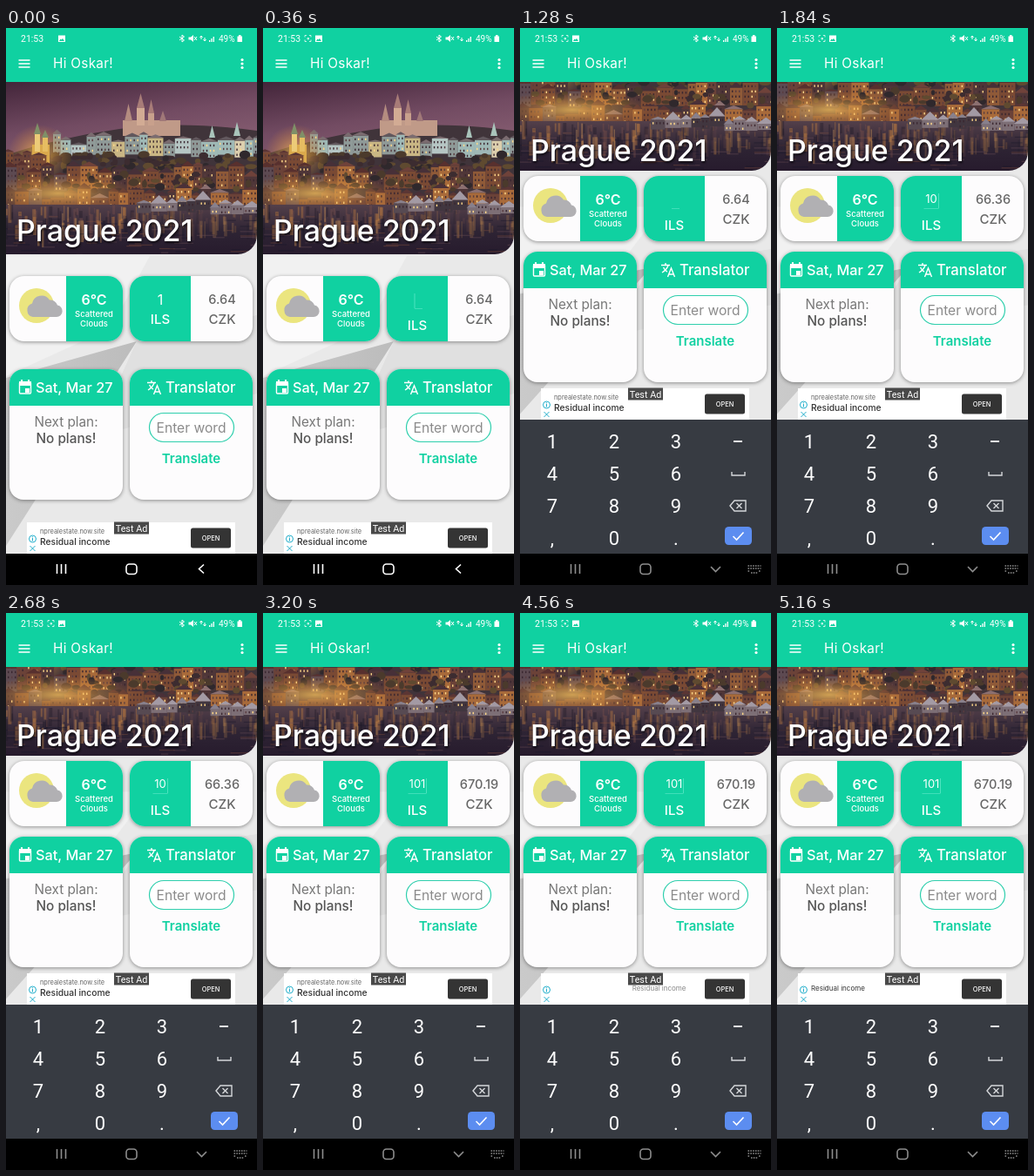
Animation, 288 px wide and 640 px high, one loop 5.6 s. Source, as an HTML page:

```html
<!DOCTYPE html>
<html lang="en">
<head>
<meta charset="utf-8">
<title>Travel dashboard</title>
<style>
html, body { margin: 0; height: 100%; overflow: hidden; background: #000; }
svg { display: block; width: 100vw; height: 100vh; font-family: Inter, Lato, sans-serif; }
.c { text-anchor: middle; }
.w { fill: #fff; }
.g { fill: #10d1a1; }
.b { font-weight: 600; }
.m { font-weight: 500; }
.robo { font-family: Roboto, sans-serif; }
.line { fill: none; stroke: #fff; stroke-width: 1.4; }
.card { fill: #fdfcfd; filter: drop-shadow(0 1px 2px #0006); }
#title { filter: drop-shadow(1px 2px 1px #0009); }
#city { filter: blur(.6px); }
</style>
</head>
<body>
<svg viewBox="0 0 288 640" preserveAspectRatio="none">
  <defs>
    <linearGradient id="sky" x2=".3" y2="1"><stop stop-color="#43253a"/><stop offset=".4" stop-color="#724b62"/><stop offset="1" stop-color="#9a6f80"/></linearGradient>
    <linearGradient id="river" x2="0" y2="1"><stop stop-color="#54404a"/><stop offset=".5" stop-color="#2e2434"/><stop offset="1" stop-color="#261a2c"/></linearGradient>
    <radialGradient id="glow"><stop stop-color="#ffc45c" stop-opacity=".75"/><stop offset="1" stop-color="#e08a30" stop-opacity="0"/></radialGradient>
    <linearGradient id="shade"><stop stop-color="#cacaca"/><stop offset="1" stop-color="#bcbcbc"/></linearGradient>
    <clipPath id="heroClip"><path d="M0 62H288V238a22 22 0 0 1-22 22H0z"/></clipPath>
    <clipPath id="adClip"><rect x="37" y="568" width="173" height="36"/></clipPath>
  </defs>

  <rect y="62" width="288" height="542" fill="#e9e9e9"/>
  <g id="bg">
    <path d="M0 262H165L120 345 0 400z" fill="#f1f1f1"/>
    <path d="M0 402 150 360 0 595z" fill="url(#shade)"/>
    <path d="M150 360 288 330V420L100 470z" fill="#e0e0e0"/>
  </g>

  <g data-up="96" clip-path="url(#heroClip)"><g id="city"></g></g>
  <g data-up="92.5">
    <text id="title" class="w m" x="12" y="245" font-size="34">Prague 2021</text>
  </g>

  <g data-up="115">
    <rect class="card" x="4" y="285" width="130" height="75" rx="17"/>
    <path class="g" d="M69 285h48a17 17 0 0 1 17 17v41a17 17 0 0 1-17 17H69z"/>
    <circle cx="35" cy="319" r="20" fill="#ebe57f"/>
    <path d="M31 332a8 8 0 0 1-1-15.500a11 11 0 0 1 20-4a8.500 8.500 0 0 1 9 6a6.800 6.800 0 0 1-1 13.500z" fill="#b1b0b3"/>
    <g class="w c">
      <text class="b" x="101" y="318" font-size="16">6°C</text>
      <text class="m" x="101" y="332" font-size="9.500">Scattered</text>
      <text class="m" x="101" y="343" font-size="9.500">Clouds</text>
    </g>
    <rect class="card" x="142" y="285" width="141" height="75" rx="17"/>
    <path class="g" d="M212 285h-53a17 17 0 0 0-17 17v41a17 17 0 0 0 17 17h53z"/>
    <g class="c">
      <text id="amount" class="w" x="177"></text>
      <text id="unit" class="w m" x="177" font-size="15">ILS</text>
      <text id="rate" class="m" x="248" y="317" font-size="14.500" fill="#666"></text>
      <text class="m" x="248" y="340" font-size="15" fill="#666">CZK</text>
    </g>
    <path id="under" stroke="#4ce3bf" stroke-width="1"/>
    <path id="caret" stroke="#4ce3bf" stroke-width="1"/>
  </g>

  <g data-up="135">
    <rect class="card" x="4" y="392" width="130" height="150" rx="16"/>
    <path class="g" d="M4 434v-26a16 16 0 0 1 16-16h98a16 16 0 0 1 16 16v26z"/>
    <rect class="line" x="15.500" y="407" width="13" height="13" rx="1"/>
    <path class="w" d="M15 406h14v5H15zM17 404h2v3h-2zM25 404h2v3h-2zM22 414h5v5h-5z"/>
    <text class="w m" x="34" y="419" font-size="16.300">Sat, Mar 27</text>
    <g class="c" font-size="15.300">
      <text x="69" y="458" fill="#777">Next plan:</text>
      <text class="m" x="69" y="477" fill="#555">No plans!</text>
    </g>
    <rect class="card" x="142" y="392" width="141" height="150" rx="16"/>
    <path class="g" d="M142 434v-26a16 16 0 0 1 16-16h109a16 16 0 0 1 16 16v26z"/>
    <path class="line" d="M162 407.500h10M167 405v2.500M170 408q-2 5-7 8M164.500 410q2 4 4.500 5M169.500 421l4-10 4 10M171 418h5"/>
    <text class="w m" x="183" y="419" font-size="16.700">Translator</text>
    <rect x="164.500" y="442.500" width="97" height="33" rx="16.500" fill="#fff" stroke="#2fcfad" stroke-width="1.200"/>
    <text class="c" x="212.500" y="465" font-size="15.600" fill="#8b8b8b">Enter word</text>
    <text class="c g b" x="212.500" y="500" font-size="15">Translate</text>
  </g>

  <g data-up="154">
    <rect x="24" y="568" width="239" height="36" fill="#fff"/>
    <circle cx="30.500" cy="587" r="4" fill="none" stroke="#21aecb"/>
    <path d="M30.500 586v3.500M30.500 584.300v1M27.500 595l6 6M33.500 595l-6 6" stroke="#21aecb"/>
    <g clip-path="url(#adClip)" fill="#333">
      <g id="oldAd">
        <text x="39" y="581" font-size="7.400" fill="#666">nprealestate.now.site</text>
        <text class="m" x="39" y="594" font-size="10.300">Residual income</text>
      </g>
      <text id="newAd" y="588" font-size="8">Residual income</text>
    </g>
    <rect x="212" y="574.500" width="46" height="23" rx="2.500" fill="#343434"/>
    <text class="w c m" x="235" y="589" font-size="7.400">OPEN</text>
    <rect x="124" y="567.500" width="40" height="14" fill="#303030" fill-opacity=".88"/>
    <text class="w c robo" x="144" y="578.500" font-size="10.800">Test Ad</text>
  </g>

  <g>
    <rect class="g" width="288" height="62"/>
    <g class="w robo" font-size="10">
      <text x="17" y="16" font-size="10.500">21:53</text>
      <text x="244" y="16">49%</text>
      <path fill-rule="evenodd" d="M60 8.500h8v7.500h-8zM61 15h6l-2-3-1.500 1.500-1-1z"/>
      <path d="M209.500 10.500h2.500l3-2.500v8l-3-2.500h-2.500zM233 16v-2h1.300v2zM235.300 16v-4h1.300v4zM237.600 16v-6h1.300v6z"/>
      <path d="M265.500 9.500h1.500V8h2.500v1.500h1.500V16h-5.500z"/>
    </g>
    <path id="shot" class="line" style="stroke-width:1" d="M48 10.500v-2h2M53 8.500h2v2M55 13.500v2h-2M50 15.500h-2v-2M51 11.500h1.500v1.500H51z"/>
    <path class="line" style="stroke-width:1" d="M199 10l5.500 4-2.500 2V8l2.500 2-5.500 4M216 10l3 4M219 10l-3 4M224 9v4M222.500 11l1.500-2 1.500 2M228 11v4M226.500 13l1.500 2 1.500-2"/>
    <path class="line" d="M14.500 37h13M14.500 41h13M14.500 45h13" style="stroke-width:1.600"/>
    <text class="w" x="54" y="46" font-size="15.300" letter-spacing=".3">Hi Oskar!</text>
    <g class="w"><circle cx="271" cy="36.500" r="1.600"/><circle cx="271" cy="41" r="1.600"/><circle cx="271" cy="45.500" r="1.600"/></g>
  </g>

  <g id="keys" class="w c robo" font-size="22">
    <rect y="450" width="288" height="154" fill="#373b42"/>
    <path class="line" style="stroke:#d5d7da" d="M243 510v4h15v-4M241 549l5-6h13v12h-13zM248.500 546l6 6M254.500 546l-6 6"/>
    <path class="line" style="stroke-width:1.800" d="M245 475h10"/>
    <rect x="235" y="573" width="31" height="21" rx="4.500" fill="#5c8df0"/>
    <path class="line" style="stroke-width:1.600" d="M244.500 584l4 4 8-8.500"/>
  </g>

  <rect y="604" width="288" height="36" fill="#000"/>
  <g id="nav" fill="none" stroke="#fff" stroke-width="1.600">
    <path d="M58.500 616v11M63.500 616v11M68.500 616v11"/>
    <rect x="138" y="616" width="12" height="11.500" rx="3.500"/>
    <path id="back" d="M227 616.500l-5.500 5 5.500 5"/>
    <g id="down">
      <path d="M219 619l5.500 5.500 5.500-5.500"/>
      <path stroke-width="1.300" stroke-dasharray="1.600 1.200" d="M261.500 618h15M261.500 621h15M261.500 624h2M265 626h8M274 624h2.500"/>
    </g>
  </g>
</svg>
<script>
const $ = id => document.getElementById(id);
const set = (id, attrs) => { for (const k in attrs) $(id).setAttribute(k, attrs[k]); };
const clamp = v => Math.max(0, Math.min(1, v));

// Night city picture, built from seeded flat shapes
let seed = 41;
const rnd = (a = 0, b = 1) => a + (b - a) * (seed = seed * 16807 % 2147483647) / 2147483647;
const pick = list => list[Math.floor(rnd(0, list.length))];
const times = (n, part) => Array.from({ length: n }, part).join('');
const box = (x, y, w, h, fill, o = 1) =>
  `<rect x="${x}" y="${y}" width="${w}" height="${h}" fill="${fill}" opacity="${o}"/>`;
const blob = (x, y, rx, ry, fill) => `<ellipse cx="${x}" cy="${y}" rx="${rx}" ry="${ry}" fill="${fill}"/>`;
const shape = (d, fill) => `<path d="${d}" fill="${fill}"/>`;
const spire = (x, y, w, h, fill) => shape(`M${x} ${y}l${w / 2} ${-h} ${w / 2} ${h}z`, fill);

function house(x, base, w, h, wall, roof, slope) {
  let s = box(x, base - h, w, h, wall) + spire(x - 1, base - h, w + 2, slope, roof);
  for (let wx = x + 2; wx < x + w - 2; wx += 4)
    for (let wy = base - h + 3; wy < base - 3; wy += 6)
      s += box(wx, wy, 1.4, 2.4, pick(['#3a2730', '#3a2730', '#ffd98a', '#5a3d40']));
  return s;
}
function street(x, end, base, minH, maxH, walls, roofs, slope) {
  let s = '';
  while (x < end) {
    const w = rnd(9, 21);
    s += house(x, base + rnd(-3, 3), w, rnd(minH, maxH), pick(walls), pick(roofs), rnd(2, slope));
    x += w;
  }
  return s;
}
function city() {
  const tree = ['#2f282c', '#4b3a2c', '#3c2c30', '#5f4a30'];
  const dusk = ['#7a4a34', '#a86a3a', '#4f3638', '#6b4238', '#8f5a38', '#5d4a52'];
  return box(0, 62, 288, 140, 'url(#sky)') +
    shape('M0 146Q60 126 130 116T288 118V215H0z', '#40343a') +
    // cathedral
    box(134, 106, 66, 18, '#c09a88') + spire(136, 107, 9, 20, '#b48c80') +
    box(150, 92, 9, 20, '#d2ab94') + spire(150, 92, 9, 17, '#a87c78') +
    box(163, 98, 7, 14, '#c8a08c') + spire(163, 98, 7, 16, '#a87c78') + spire(176, 107, 8, 12, '#a07878') +
    spire(233, 126, 7, 14, '#a9c4bb') + spire(261, 124, 8, 16, '#a9c4bb') +
    // palace row
    street(54, 288, 147, 14, 25, ['#dccfae', '#9fb9b6', '#c9b684', '#b6c6c4', '#8f9a98'], ['#62585e', '#7b6c70'], 5) +
    times(90, () => blob(rnd(48, 288), rnd(145, 166), rnd(2, 7), rnd(2, 5), pick(tree))) +
    // lit church on the left
    blob(38, 145, 36, 34, 'url(#glow)') +
    box(30, 134, 20, 32, '#dbaa4c') + box(33, 122, 6, 20, '#eccb78') + spire(32, 122, 8, 13, '#7f9068') +
    box(42, 126, 6, 16, '#e6bd62') + spire(41, 126, 8, 9, '#7f9068') +
    street(-4, 30, 166, 14, 26, dusk, ['#5a3434'], 7) +
    // old town and embankment
    street(-4, 288, 187, 18, 28, dusk, ['#58302e', '#6f423a', '#473038'], 8) +
    times(45, () => blob(rnd(0, 288), rnd(168, 190), rnd(2, 6), rnd(2, 5), pick(tree))) +
    street(-4, 288, 206, 12, 22, dusk, ['#5b3634', '#4a3038', '#8b6f70'], 7) +
    blob(60, 190, 90, 22, 'url(#glow)') +
    box(0, 203, 288, 60, 'url(#river)') +
    times(170, () => {
      const x = rnd(-5, 288);
      return box(x, rnd(203, 228), rnd(1, 4), rnd(4, 26), pick(['#c9803f', '#e0a058', '#79504a', '#1d1926']), x < 150 ? .38 : .2);
    }) +
    street(150, 288, 212, 7, 13, ['#574a52', '#7d6f76', '#41363f'], ['#a39aa4', '#88808c'], 14) +
    times(70, () => box(rnd(-10, 288), rnd(216, 260), rnd(6, 30), 1.2, pick(['#6f5058', '#16142a', '#84503e']), .4));
}
$('city').innerHTML = city();

$('keys').innerHTML += ['123', '456', '789', ',0.'].map((row, r) =>
  [...row].map((ch, c) => `<text x="${37 + 71 * c}" y="${482.5 + 37.3 * r}">${ch}</text>`).join('')).join('');

const layers = document.querySelectorAll('[data-up]');
const blinks = [200, 1200, 1440, 2200, 2680, 3600, 4080, 4600, 5080];
const half = [4.5, 4.5, 8.5, 10.5];

function draw(t) {
  // Keyboard slides in, then the page is laid out in the smaller space
  const open = t >= 600, rise = (1 - clamp((t - 420) / 180)) ** 2;
  layers.forEach(g => g.setAttribute('transform', `translate(0 ${open ? -g.dataset.up : 0})`));
  set('bg', { transform: open ? 'translate(0 17.6) scale(1 .716)' : '' });
  set('keys', { transform: `translate(0 ${190 * rise})` });
  set('nav', { stroke: t < 720 ? '#fff' : '#8d8d8d' });
  set('back', { opacity: t < 420 ? 1 : 0 });
  set('down', { opacity: t < 420 ? 0 : 1 });
  set('shot', { opacity: t < 40 ? 0 : .75 });

  // Amount field and converted value
  const edit = t >= 200;
  const typed = !edit ? '1' : t < 1440 ? '' : t < 1640 ? '1' : t < 3000 ? '10' : '101';
  const w = half[typed.length], caretX = 177 + (typed ? w : -3);
  $('amount').textContent = typed;
  set('amount', { y: edit ? 316 : 318, 'font-size': edit ? 13 : 16 });
  set('unit', { y: edit ? 347 : 340 });
  $('rate').textContent = t < 1640 ? '6.64' : t < 3000 ? '66.36' : '670.19';
  set('under', { d: `M${typed ? 177 - w : 174} 322.5H${typed ? 177 + w : 183}`, opacity: edit ? .8 : 0 });
  set('caret', { d: `M${caretX} 305v17`, opacity: blinks.filter(b => t >= b).length % 2 });

  // Ad caption is replaced from the right
  const out = clamp((t - 4360) / 180), p = clamp((t - 4370) / 520);
  set('oldAd', { transform: `translate(${-90 * out * out} 0)`, opacity: 1 - out });
  set('newAd', { x: 39 + 224 * (1 - p) ** 2, opacity: Math.min(1, p * 1.6) });
}
function frame() {
  draw(performance.now() % 5600);
  requestAnimationFrame(frame);
}
frame();
</script>
</body>
</html>
```
